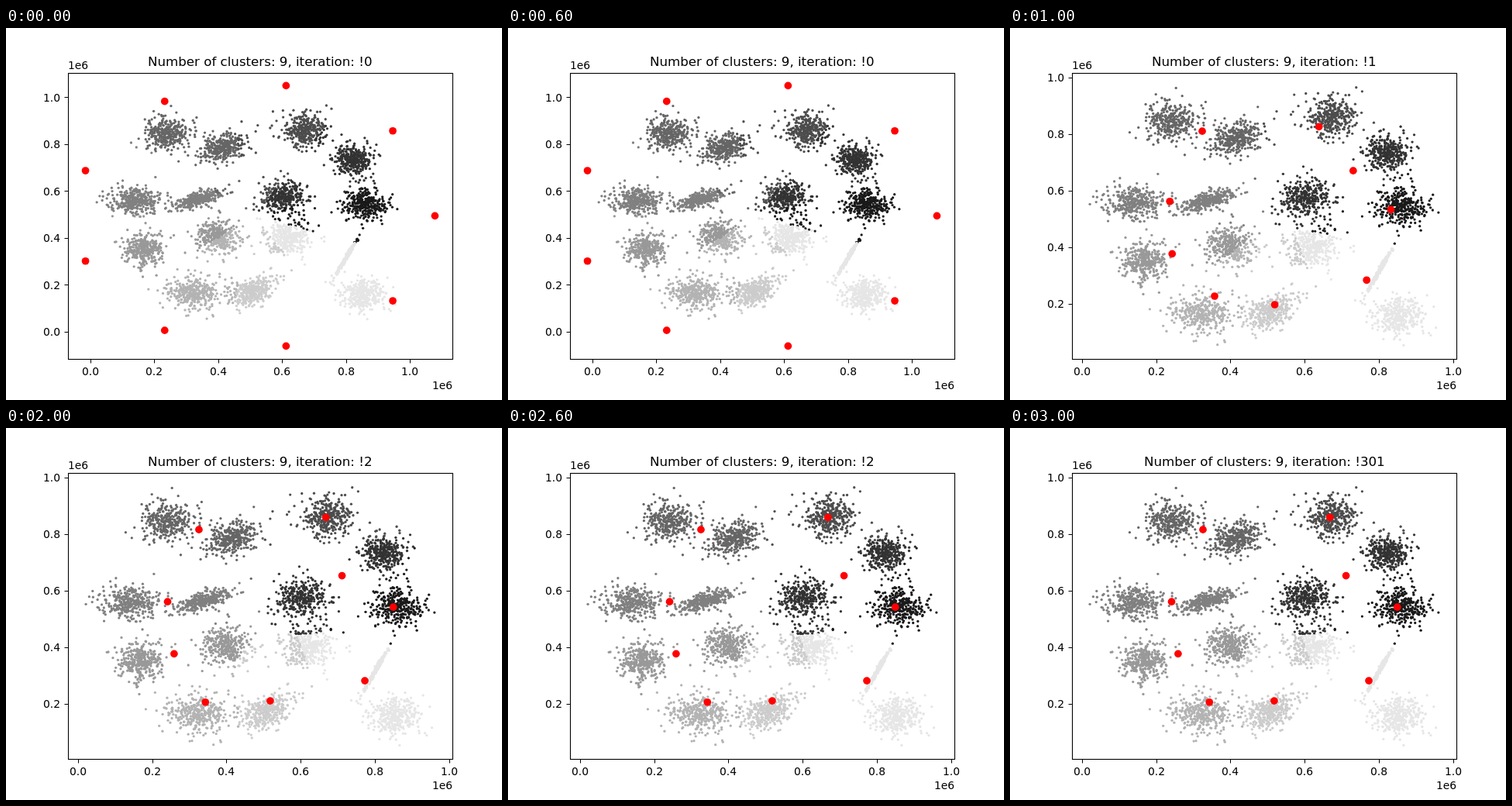
An HTML page with a canvas that plays this animation: 640x480 px, repeating every 4000 ms.

```html
<!DOCTYPE html>
<html lang="en">
<head>
<meta charset="utf-8">
<title>Clustering</title>
<style>
html, body { margin: 0; width: 100%; height: 100%; overflow: hidden; background: #fff; }
canvas { display: block; }
</style>
</head>
<body>
<canvas id="plot" width="640" height="480"></canvas>
<script>
const ctx = document.getElementById('plot').getContext('2d');
const LEFT = 80, RIGHT = 576, BOTTOM = 427;
const PER_BLOB = 333, K = 9;
const LOW = [.0198, .0511], HIGH = [.962, .9708];

// Blobs in thousandths: mean x, mean y and, where not round, spread x, spread y, correlation
const blobs = [
  [604, 574], [802, 318, 14, 32, .985], [416, 786, 35, 32, .3], [823, 732, 29, 31],
  [851, 158], [339, 564, 36, 20, .65], [169, 349, 31], [619, 398], [241, 844],
  [322, 165, 42], [139, 557, 41, 29], [509, 175, 34, 34, .45], [399, 404],
  [861, 546], [674, 860]
];

let seed = 7;
function random() {
  seed = (seed * 16807) % 2147483647;
  return seed / 2147483647;
}

// Normal distribution with evenly stepped radii and angles, loosened by chance
function sample([mx, my, sx = 35, sy = 34, corr = 0], i) {
  const r = (.75 + .5 * random()) * Math.sqrt(-2 * Math.log((i + random()) / PER_BLOB));
  const angle = i * 2.39996 + 2 * random();
  const u = r * Math.cos(angle), v = r * Math.sin(angle);
  return [
    (mx + sx * u) / 1000,
    (my + sy * (corr * u + Math.sqrt(1 - corr * corr) * v)) / 1000
  ];
}

const inRange = p => p.every((v, axis) => v >= LOW[axis] && v <= HIGH[axis]);
const points = blobs
  .flatMap(b => Array.from({ length: PER_BLOB }, (_, i) => sample(b, i)))
  .filter(inRange);

function nearest([x, y], centres) {
  const dist = centres.map(([cx, cy]) => Math.hypot(x - cx, y - cy));
  return dist.indexOf(Math.min(...dist));
}

// One k-means step: each centre moves to the mean of its points
function improve(centres) {
  const sums = centres.map(() => [0, 0, 0]);
  for (const p of points) {
    const s = sums[nearest(p, centres)];
    s[0] += p[0];
    s[1] += p[1];
    s[2]++;
  }
  return sums.map(([x, y, n]) => [x / n, y / n]);
}

// Starting centres lie on a circle around the data
const ring = Array.from({ length: K }, (_, i) => {
  const a = i * 2 * Math.PI / K;
  return [.515 + .5635 * Math.cos(a), .494 + .5635 * Math.sin(a)];
});
const moved = improve(ring);
const settled = improve(moved);
const steps = [[0, ring], [1, moved], [2, settled], [301, settled]];

// Fits the data and the centres into the plot, inside a 5% margin
function scale(centres, axis, from, to) {
  const values = centres.map(c => c[axis]);
  const lo = Math.min(LOW[axis], ...values);
  const hi = Math.max(HIGH[axis], ...values);
  return v => from + (to - from) * (v - lo) / (hi - lo);
}

function dot(x, y, r, color) {
  ctx.fillStyle = color;
  ctx.beginPath();
  ctx.arc(x, y, r, 0, 2 * Math.PI);
  ctx.fill();
}

// anchor: 0 left, .5 centre, 1 right; text starts on whole pixels
function text(str, x, y, anchor, size = 13.89) {
  ctx.fillStyle = '#000';
  ctx.font = `${size}px "DejaVu Sans", sans-serif`;
  const width = ctx.measureText(str).width;
  ctx.fillText(str, Math.round(x - anchor * width), Math.round(y));
}

function draw([label, centres]) {
  const px = scale(centres, 0, 102.55, 553.45);
  const py = scale(centres, 1, 410.4, 74.4);

  ctx.fillStyle = '#fff';
  ctx.fillRect(0, 0, 640, 480);

  for (const p of points) {
    const level = Math.round(25.5 * (nearest(p, centres) + 1));
    dot(px(p[0]), py(p[1]), 1.65, `rgb(${level},${level},${level})`);
  }
  for (const [x, y] of centres) dot(px(x), py(y), 4.86, '#f00');

  ctx.strokeStyle = '#000';
  ctx.lineWidth = 1.1;
  ctx.strokeRect(LEFT + .5, 58.5, RIGHT - LEFT, 369);

  for (let i = 0; i <= 5; i++) {
    const v = i / 5, x = px(v), y = py(v);
    ctx.fillStyle = '#000';
    ctx.fillRect(Math.round(x), BOTTOM + 1, 1, 4.5);
    text(v.toFixed(1), x, 448, .5);
    if (y < BOTTOM) {
      ctx.fillRect(LEFT - 4.5, Math.round(y), 4.5, 1);
      text(v.toFixed(1), 70.3, y + 5.3, 1);
    }
  }
  text('1e6', LEFT, 53, 0);
  text('1e6', RIGHT, 466, 1);
  text(`Number of clusters: ${K}, iteration: !${label}`, 328, 49, .5, 16.67);
}

let shown = -1;
function tick() {
  const step = Math.floor(performance.now() / 1000) % steps.length;
  if (step !== shown) draw(steps[shown = step]);
  requestAnimationFrame(tick);
}
tick();
</script>
</body>
</html>
```
